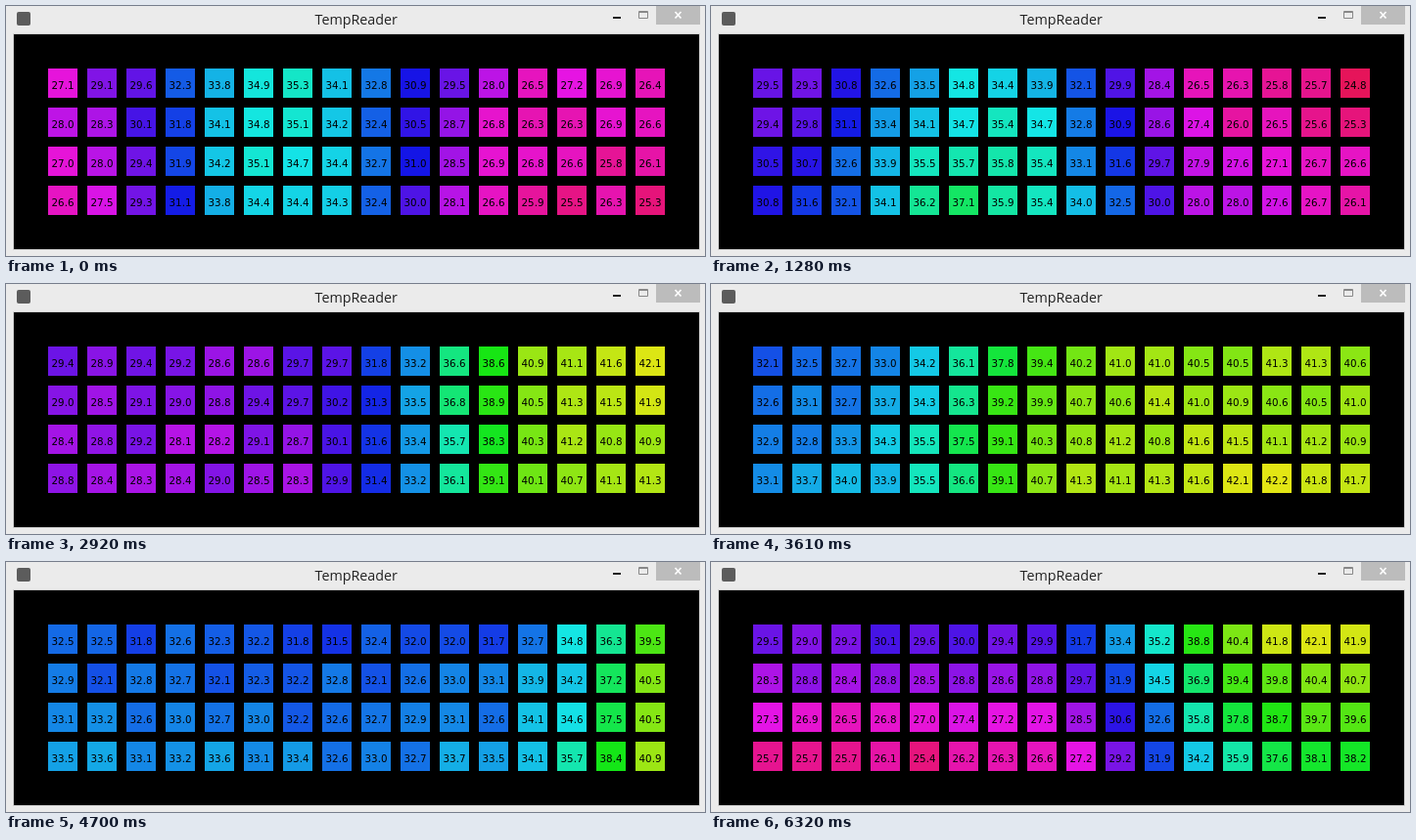
These frames come from a looping animation (714 px wide and 256 px high, 6420 ms). An HTML page:

```html
<!DOCTYPE html>
<html lang="en">
<head>
<meta charset="utf-8">
<title>TempReader</title>
<style>
html, body { margin: 0; width: 100%; height: 100%; overflow: hidden; background: #ebebeb; }
svg { display: block; width: 714px; height: 256px; }
text { text-anchor: middle; }
.title { font: 14.3px "Open Sans", "Noto Sans", sans-serif; fill: #222; }
.cell { font: 10.3px "DejaVu Sans", sans-serif; fill: #000; }
</style>
</head>
<body>
<svg viewBox="0 0 714 256">
  <rect width="714" height="256" fill="#ebebeb"/>
  <rect x="11" y="6" width="14" height="14" rx="2" fill="#5c5c5c"/>
  <text class="title" x="357.7" y="19">TempReader</text>
  <rect x="620" y="11" width="8" height="2" fill="#222"/>
  <path d="M646.5 5.5h9v7h-9zM646 6.5h10" fill="none" stroke="#888"/>
  <rect x="664" width="45" height="19" fill="#bcbcbc"/>
  <path d="M683.5 6l6 6.5m0-6.5l-6 6.5" stroke="#fff" stroke-width="1.7"/>
  <rect x="7" y="28" width="702" height="222" fill="#d2d2d2"/>
  <rect x="8" y="29" width="700" height="220"/>
  <g id="grid"></g>
</svg>
<script>
const LOOP = 6420, COLS = 16, ROWS = 4;
const NS = "http://www.w3.org/2000/svg";

// Background heat at both ends, a warm spot on the left, a warm body
// entering from the right up to a column (edge), and a vertical tilt.
const poses = [
  { at: 0,    left: 26.6, right: 26,   spot: 9.6, body: 16,   edge: 20,   tilt: .2 },
  { at: 1280, left: 29.2, right: 25.6, spot: 8.8, body: 16,   edge: 20,   tilt: -.6 },
  { at: 2100, left: 25.4, right: 25,   spot: 0,   body: 16.5, edge: 13.4, tilt: .5 },
  { at: 3610, left: 32.6, right: 32.2, spot: 0,   body: 9,    edge: 5.1,  tilt: -.25 },
  { at: 4700, left: 32.8, right: 32.2, spot: 0,   body: 14,   edge: 14.6, tilt: -.4 },
  { at: 5350, left: 27.2, right: 27,   spot: 9.5, body: 12.8, edge: 11.5, tilt: .7 },
  { at: 6320, left: 27.6, right: 27.6, spot: 0,   body: 12.6, edge: 10.1, tilt: 1.3 }
];

const span = (from, to, n) =>
  Array.from({ length: n }, (_, i) => from + (to - from) * i / (n - 1));

const ticks = [0, ...span(150, 1130, 8), 1280, ...span(1430, 2100, 5), 2250,
  ...span(2400, 3340, 8), 3460, 3610, ...span(3860, 4430, 5),
  4550, 4700, ...span(4840, 5350, 5), ...span(5600, 6320, 6)];

const mix = (a, b, k) => a + (b - a) * k;
const rise = x => 1 / (1 + Math.exp(-x / 1.1));

const noise = (cell, tick) => {
  const v = Math.sin(cell * 12.9898 + tick * 78.233) * 43758.5453;
  return v - Math.floor(v) - .5;
};

function poseAt(time) {
  const next = Math.max(1, poses.findIndex(p => p.at >= time));
  const a = poses[next - 1], b = poses[next];
  const k = (time - a.at) / (b.at - a.at);
  const pose = {};
  for (const key in a) pose[key] = mix(a[key], b[key], k);
  return pose;
}

const heat = (p, col, row) =>
  mix(p.left, p.right, col / (COLS - 1))
  + p.spot * rise(col - 2.7) * rise(8.8 - col)
  + p.body * rise(col - p.edge)
  + p.tilt * (1.5 - row);

function add(name, attrs) {
  const el = document.createElementNS(NS, name);
  for (const key in attrs) el.setAttribute(key, attrs[key]);
  return document.getElementById("grid").appendChild(el);
}

const cells = Array.from({ length: COLS * ROWS }, (_, i) => {
  const col = i % COLS, row = Math.floor(i / COLS);
  const x = 43 + 40 * col, y = 64 + 40 * row;
  return {
    col, row,
    box: add("rect", { x, y, width: 30, height: 30 }),
    label: add("text", { class: "cell", x: x + 15, y: y + 20.5 })
  };
});

function draw(tick) {
  const pose = poseAt(ticks[tick]);
  cells.forEach(({ col, row, box, label }, i) => {
    const temp = heat(pose, col, row) + noise(i, tick) * 1.2;
    const hue = (736 - 16 * temp + 360) % 360;
    box.setAttribute("fill", `hsl(${hue.toFixed(1)}, 84%, 49%)`);
    label.textContent = temp.toFixed(1);
  });
}

let shown = -1;
function update(now) {
  const time = now % LOOP;
  let tick = ticks.length - 1;
  while (ticks[tick] > time) tick--;
  if (tick !== shown) draw(shown = tick);
  requestAnimationFrame(update);
}
update(performance.now());
</script>
</body>
</html>
```
